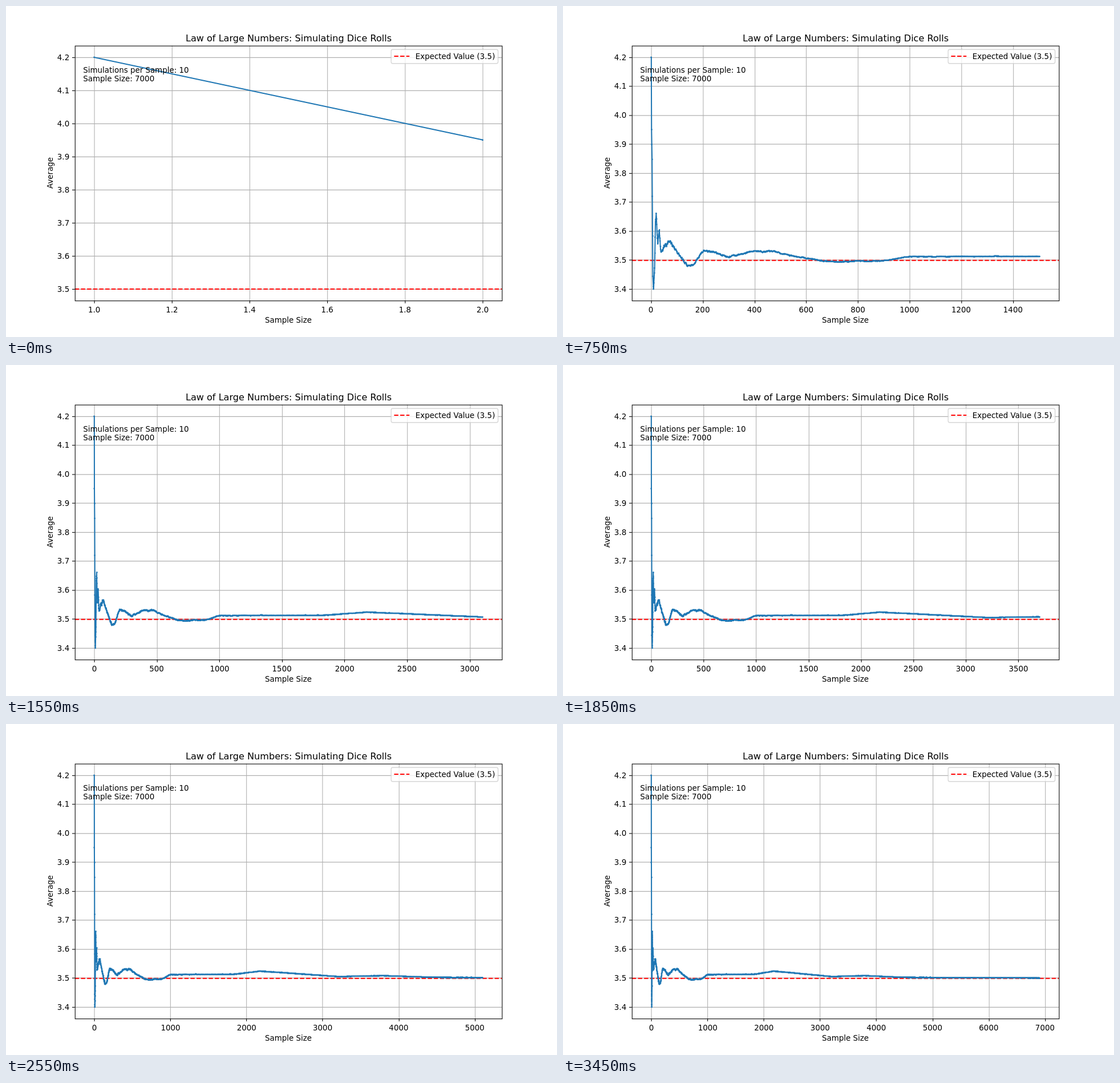
Animation of 966 by 580 pixels, one loop 3.5 s. Source, as an HTML page with a canvas:

```html
<!DOCTYPE html>
<html lang="en">
<head>
<meta charset="utf-8">
<title>Dice averages</title>
<style>
html, body { margin: 0; width: 966px; height: 580px; overflow: hidden; background: #fff; }
canvas { display: block; }
</style>
</head>
<body>
<canvas id="plot" width="966" height="580"></canvas>
<script>
const ctx = document.getElementById('plot').getContext('2d');
const STEP_MS = 50, STEPS = 70, PER_STEP = 100;
const W = 1000, H = 600;                       // drawing units
const AX = { l: 125, r: 900, t: 72, b: 534 };
const PT = 100 / 72;
const thin = 0.8 * PT, thick = 1.5 * PT;
const BLUE = '#1f77b4', GREY = '#b0b0b0';

// Turning points of the running average: [sample, thousandths above 3.5]
const TURNS = [
  [1, 700], [2, 450], [4, 345], [5, 220], [7, -57], [10, -100], [14, -30], [17, 122],
  [20, 150], [26, 50], [32, 110], [38, 30], [65, 65], [100, 32], [130, -18], [165, -14],
  [203, 35], [300, 11], [400, 32], [475, 29], [560, 12], [700, -6], [890, -3], [1000, 12],
  [1850, 13], [2180, 24], [3200, 5], [3800, 8], [4500, 2], [6902, 0]
];

function rng(seed) {
  return () => (seed = (seed * 1664525 + 1013904223) % 4294967296) / 4294967296;
}

// Straight runs between turns plus a jitter that fades as samples pile up.
function buildAverages() {
  const rand = rng(7), avg = [];
  let jitter = 0, seg = 0;
  for (let x = 1; x <= TURNS.at(-1)[0]; x++) {
    if (x > TURNS[seg + 1][0]) seg++;
    const [x0, v0] = TURNS[seg], [x1, v1] = TURNS[seg + 1];
    jitter = 0.9 * jitter + (rand() - 0.5) * 900 * x / (x * x + 900);
    avg.push(3.5 + (v0 + (v1 - v0) * (x - x0) / (x1 - x0) + jitter) / 1000);
  }
  return avg;
}
const averages = buildAverages();

function tickStep(span) {
  const raw = span / 9, mag = 10 ** Math.floor(Math.log10(raw));
  return mag * [1, 2, 2.5, 5, 10].find(s => s * mag >= raw);
}

// Pixel rounding with a fixed direction for exact halves.
const halfDown = v => Math.ceil(v - 0.5 - 1e-6);
const halfUp = v => Math.floor(v + 0.5 + 1e-6);
const crisp = v => halfDown(v) + 0.5;

function line(x1, y1, x2, y2, color, width, dash = []) {
  ctx.strokeStyle = color;
  ctx.lineWidth = width;
  ctx.setLineDash(dash);
  ctx.beginPath();
  ctx.moveTo(x1, y1);
  ctx.lineTo(x2, y2);
  ctx.stroke();
  ctx.setLineDash([]);
}

const redDash = (x1, x2, y) => line(x1, y, x2, y, 'red', thick, [3.7 * thick, 1.6 * thick]);

// anchor: 0 left, 0.5 centre, 1 right
function text(str, x, y, anchor = 0, pt = 10) {
  ctx.font = `${pt * PT}px "DejaVu Sans", sans-serif`;
  ctx.fillStyle = '#000';
  ctx.fillText(str, Math.round(x - anchor * ctx.measureText(str).width), y);
}

function drawCurve(n, px, py) {
  ctx.strokeStyle = ctx.fillStyle = BLUE;
  ctx.lineWidth = thick;
  ctx.lineJoin = 'round';
  ctx.lineCap = 'square';
  ctx.beginPath();
  for (let i = 0; i < n; i++) ctx.lineTo(px(i + 1), py(averages[i]));
  ctx.stroke();
  ctx.lineCap = 'butt';
  ctx.lineJoin = 'miter';
  ctx.beginPath();
  for (let i = 0; i < n; i++) {
    const x = Math.round(px(i + 1)), y = Math.round(py(averages[i]));
    ctx.moveTo(x + PT, y);
    ctx.arc(x, y, PT, 0, 2 * Math.PI);
  }
  ctx.fill();
}

function drawLegend() {
  ctx.beginPath();
  ctx.roundRect(699, 78.9, 194, 25.3, 2.78);
  ctx.fillStyle = 'rgba(255,255,255,0.8)';
  ctx.fill();
  ctx.strokeStyle = 'rgba(204,204,204,0.8)';
  ctx.lineWidth = PT;
  ctx.stroke();
  redDash(704.4, 732.2, 91);
  text('Expected Value (3.5)', 743, 96);
}

function drawLabels() {
  text('Simulations per Sample: 10', 140, 121);
  text('Sample Size: 7000', 140, 137);
  text('Law of Large Numbers: Simulating Dice Rolls', 512.5, 64, 0.5, 12);
  text('Sample Size', 512.5, 574, 0.5);
  ctx.save();
  ctx.translate(85, 303);
  ctx.rotate(-Math.PI / 2);
  text('Average', 0, 0, 0.5);
  ctx.restore();
}

function draw(k) {
  const n = 2 + k * PER_STEP, span = n - 1, pad = span * 0.05;
  const yMin = k ? 3.4 : 3.5;
  const x0 = AX.l + 775 / 22, xScale = 775 / 1.1 / span;
  const px = x => x0 + (x - 1) * xScale;
  const py = y => 93 + (4.2 - y) * 420 / (4.2 - yMin);

  ctx.setTransform(966 / W, 0, 0, 580 / H, 0, 0);
  ctx.fillStyle = '#fff';
  ctx.fillRect(0, 0, W, H);

  const step = tickStep(span * 1.1);
  for (let i = Math.ceil((1 - pad) / step); i * step <= n + pad; i++) {
    const x = px(i * step), p = crisp(x);
    line(p, AX.t, p, AX.b, GREY, thin);
    line(p, AX.b, p, AX.b + 5, '#000', thin);
    text((i * step).toFixed(k ? 0 : 1), x, 555, 0.5);
  }
  for (let i = Math.round(yMin * 10); i <= 42; i++) {
    const y = py(i / 10), p = crisp(y);
    line(AX.l, p, AX.r, p, GREY, thin);
    line(AX.l - 5, p, AX.l, p, '#000', thin);
    text((i / 10).toFixed(1), 115.3, halfDown(y) + 5, 1);
  }

  redDash(AX.l, AX.r, halfUp(py(3.5)));
  drawCurve(n, px, py);

  ctx.strokeStyle = '#000';
  ctx.lineWidth = thin;
  ctx.strokeRect(AX.l + 0.5, AX.t + 0.5, AX.r - AX.l, AX.b - AX.t);
  drawLabels();
  drawLegend();
}

let shown = 0;
const start = performance.now();
function tick() {
  const t = Math.max(0, performance.now() - start);
  const k = Math.floor(t / STEP_MS) % STEPS;
  if (k !== shown) draw(shown = k);
  requestAnimationFrame(tick);
}
draw(0);
requestAnimationFrame(tick);
</script>
</body>
</html>
```
